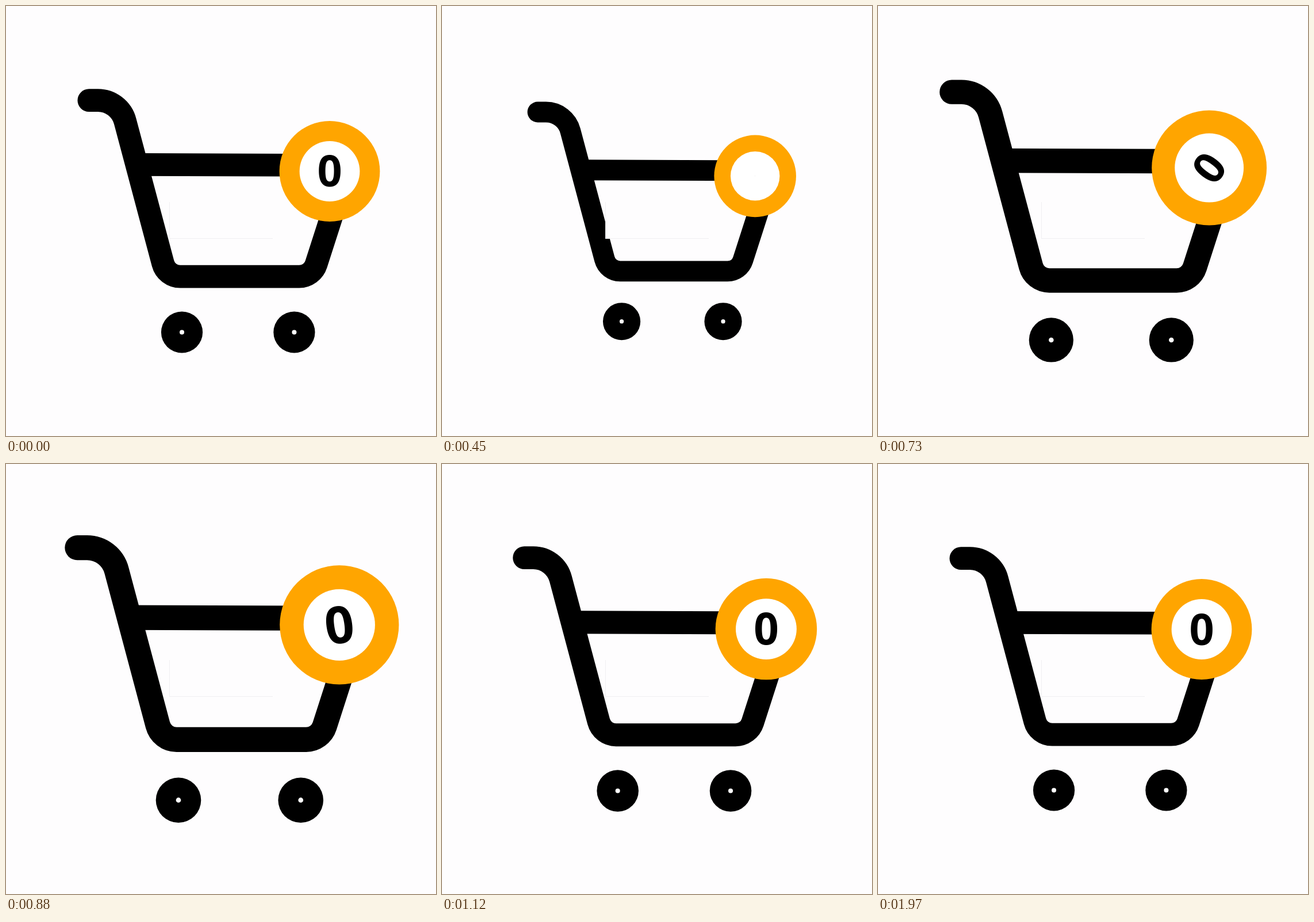
An HTML page with a canvas that plays this animation: 748x748 px, repeating every 2000 ms.

```html
<!DOCTYPE html>
<html lang="en">
<head>
<meta charset="utf-8">
<title>Cart</title>
<style>
html, body { margin: 0; width: 100%; height: 100%; overflow: hidden; background: #fefdfe; }
canvas { display: block; width: 748px; height: 748px; }
</style>
</head>
<body>
<canvas id="stage" width="748" height="748"></canvas>
<script>
const ctx = document.getElementById('stage').getContext('2d');
const LOOP = 2000, MID = 373.7;
const BG = '#fefdfe', INK = '#000', ORANGE = '#ffa500';

// Keys are [ms, value]; eased in and out between neighbours.
const CART = [[0, 1], [505, 0.9], [805, 1.1], [1170, 1]];
const DIGIT = [[0, 1], [480, 0], [805, 1]];
const SPIN = [[0, 0], [965, 2 * Math.PI]];

function valueAt(keys, t) {
  for (let i = 1; i < keys.length; i++) {
    const [t0, a] = keys[i - 1], [t1, b] = keys[i];
    if (t < t1) {
      const u = (t - t0) / (t1 - t0);
      return a + (b - a) * u * u * (3 - 2 * u);
    }
  }
  return keys[keys.length - 1][1];
}

function disc(x, y, r, color) {
  ctx.fillStyle = color;
  ctx.beginPath();
  ctx.arc(x, y, r, 0, 2 * Math.PI);
  ctx.fill();
}

function drawCart() {
  const lean = 14.8 * Math.PI / 180, flare = 17.9 * Math.PI / 180;
  ctx.strokeStyle = INK;
  ctx.lineWidth = 39.7;
  ctx.lineCap = 'round';
  ctx.beginPath();
  ctx.moveTo(144.3, 164.2);
  ctx.lineTo(160, 164.2);
  ctx.arc(160, 213, 48.8, -Math.PI / 2, -lean);
  ctx.arc(303, 439.7, 31, Math.PI - lean, Math.PI / 2, true);
  ctx.arc(510, 439.7, 31, Math.PI / 2, flare, true);
  ctx.lineTo(584, 311);
  ctx.stroke();

  ctx.lineCap = 'butt';
  ctx.beginPath();
  ctx.moveTo(226, 275.8);
  ctx.lineTo(560, 277);
  ctx.stroke();

  for (const x of [306, 501.4]) {
    disc(x, 567.5, 36.1, INK);
    disc(x, 567.5, 4, '#fff');
  }
}

function drawDigit(t) {
  const k = valueAt(DIGIT, t);
  if (k < 0.001) return;
  ctx.rotate(valueAt(SPIN, t));
  ctx.scale(k, k);
  ctx.font = '700 75.5px "Open Sans", "Noto Sans", sans-serif';
  ctx.fillStyle = INK;
  const m = ctx.measureText('0');
  ctx.fillText('0',
    (m.actualBoundingBoxLeft - m.actualBoundingBoxRight) / 2,
    (m.actualBoundingBoxAscent - m.actualBoundingBoxDescent) / 2);
}

// Fixed pale panel lying over the basket.
function drawPanel() {
  ctx.fillStyle = BG;
  ctx.fillRect(285, 341, 179, 63);
  ctx.fillStyle = '#f0eff1';
  ctx.fillRect(284, 341, 1, 64);
  ctx.fillRect(284, 404, 180, 1);
}

function draw(t) {
  const s = valueAt(CART, t);
  ctx.setTransform(1, 0, 0, 1, 0, 0);
  ctx.fillStyle = BG;
  ctx.fillRect(0, 0, 748, 748);

  ctx.save();
  ctx.translate(MID, MID);
  ctx.scale(s, s);
  ctx.translate(-MID, -MID);
  drawCart();
  ctx.restore();

  drawPanel();

  ctx.save();
  ctx.translate(MID + (563 - MID) * s, MID + (287.5 - MID) * s);
  ctx.scale(s * s, s * s);
  disc(0, 0, 87.4, ORANGE);
  disc(0, 0, 52.4, '#fff');
  drawDigit(t);
  ctx.restore();
}

const start = performance.now();
function tick() {
  draw((performance.now() - start) % LOOP);
  requestAnimationFrame(tick);
}
tick();
</script>
</body>
</html>
```
